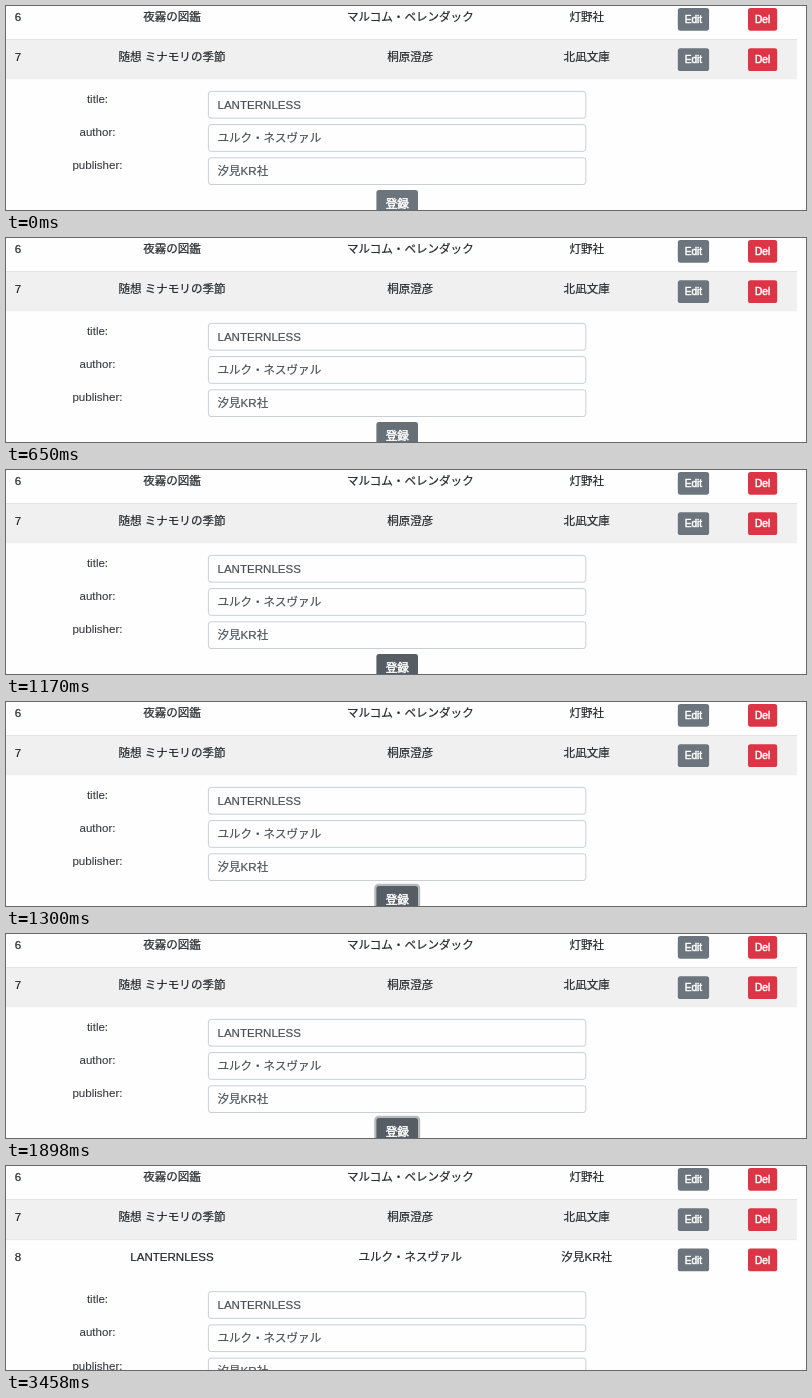
These frames come from a looping animation (800x204 px, 4290 ms). An HTML page:

```html
<!DOCTYPE html>
<html lang="ja">
<head>
<meta charset="utf-8">
<title>Book list</title>
<style>
  html, body { margin: 0; width: 100%; height: 100%; overflow: hidden; background: #fefefe; }
  svg { display: block; width: 800px; height: 204px; }
  text { font: 11.55px "Liberation Sans", "Noto Sans CJK JP", "Noto Sans CJK", sans-serif; fill: #212529; white-space: pre; }
  .mid { text-anchor: middle; }
  .cell { stroke: #212529; stroke-width: .2px; }
  .name { fill: #343a40; stroke: #343a40; stroke-width: .1px; }
  .field { fill: #fefefe; stroke: #cacfd4; }
  .value { fill: #495057; stroke: #495057; stroke-width: .2px; }
  .label { fill: #fff; stroke: #fff; stroke-width: .5px; }
  .small { font-size: 10.1px; }
</style>
</head>
<body>
<svg id="stage" viewBox="0 0 800 204"></svg>
<script>
const LOOP = 4290, ROW = 40.3, ADDED = 2210;
const stage = document.getElementById("stage");
const newBook = ["LANTERNLESS", "ユルク・ネスヴァル", "汐見KR社"];
const books = [
  ["夜霧の図鑑", "マルコム・ベレンダック", "灯野社"],
  ["随想 ミナモリの季節", "桐原澄彦", "北凪文庫"],
  newBook
];

function add(parent, tag, attrs, text = "") {
  const el = document.createElementNS("http://www.w3.org/2000/svg", tag);
  for (const key in attrs) el.setAttribute(key, attrs[key]);
  el.textContent = text;
  return parent.appendChild(el);
}

function box(parent, x, y, width, height, attrs) {
  return add(parent, "rect", { x, y, width, height, ...attrs });
}

function button(parent, x, y, width, height, fill, label, size) {
  const rect = box(parent, x, y, width, height, { rx: 2.6, fill });
  add(parent, "text", { x: x + width / 2, y: y + height / 2 + 3.8, class: "mid label " + size }, label);
  return rect;
}

const rows = books.map((book, i) => {
  const g = add(stage, "g", { transform: `translate(0 ${i * ROW})` });
  box(g, 0, -7.3, 791, ROW, { fill: i === 1 ? "#f0f0f0" : "#fefefe" });
  box(g, 0, -7.3, 791, 0.8, { fill: "#dee2e6" });
  add(g, "text", { x: 8.7, y: 14.5, class: "cell" }, i + 6);
  book.forEach((text, k) =>
    add(g, "text", { x: [166, 404.3, 580.7][k], y: 14.6, class: "mid cell" }, text));
  button(g, 671.8, 1.9, 31.3, 22.8, "#6c757d", "Edit", "small");
  button(g, 742, 1.9, 29.2, 22.8, "#dc3545", "Del", "small");
  return g;
});

const form = add(stage, "g", {});
["title:", "author:", "publisher:"].forEach((name, i) => {
  const y = 85 + i * 33.2;
  add(form, "text", { x: 91.5, y: y + 12, class: "mid name" }, name);
  box(form, 202.4, y + 0.4, 377.4, 26.7, { rx: 2.6, class: "field", "stroke-width": 1 });
  add(form, "text", { x: 211.5, y: y + 17.5, class: "value" }, newBook[i]);
});
const ring = box(form, 368.2, 181.8, 46, 32, { rx: 4.5, fill: "#b5babe" });
const submit = button(form, 370.4, 184, 41.6, 27.4, "#6c757d", "登録", "");

function buttonColor(t) {
  if (t < 650) return "#6c757d";
  if (t < 780) return "#676f77";
  return t < 1170 ? "#5a6268" : "#565d64";
}

function draw(now) {
  const t = now % LOOP, added = t >= ADDED;
  rows[2].style.display = added ? "" : "none";
  form.setAttribute("transform", `translate(0 ${added ? ROW : 0})`);
  submit.setAttribute("fill", buttonColor(t));
  ring.style.display = t >= 1300 && !added ? "" : "none";
}

const start = performance.now();
function tick() {
  draw(performance.now() - start);
  requestAnimationFrame(tick);
}
tick();
</script>
</body>
</html>
```
